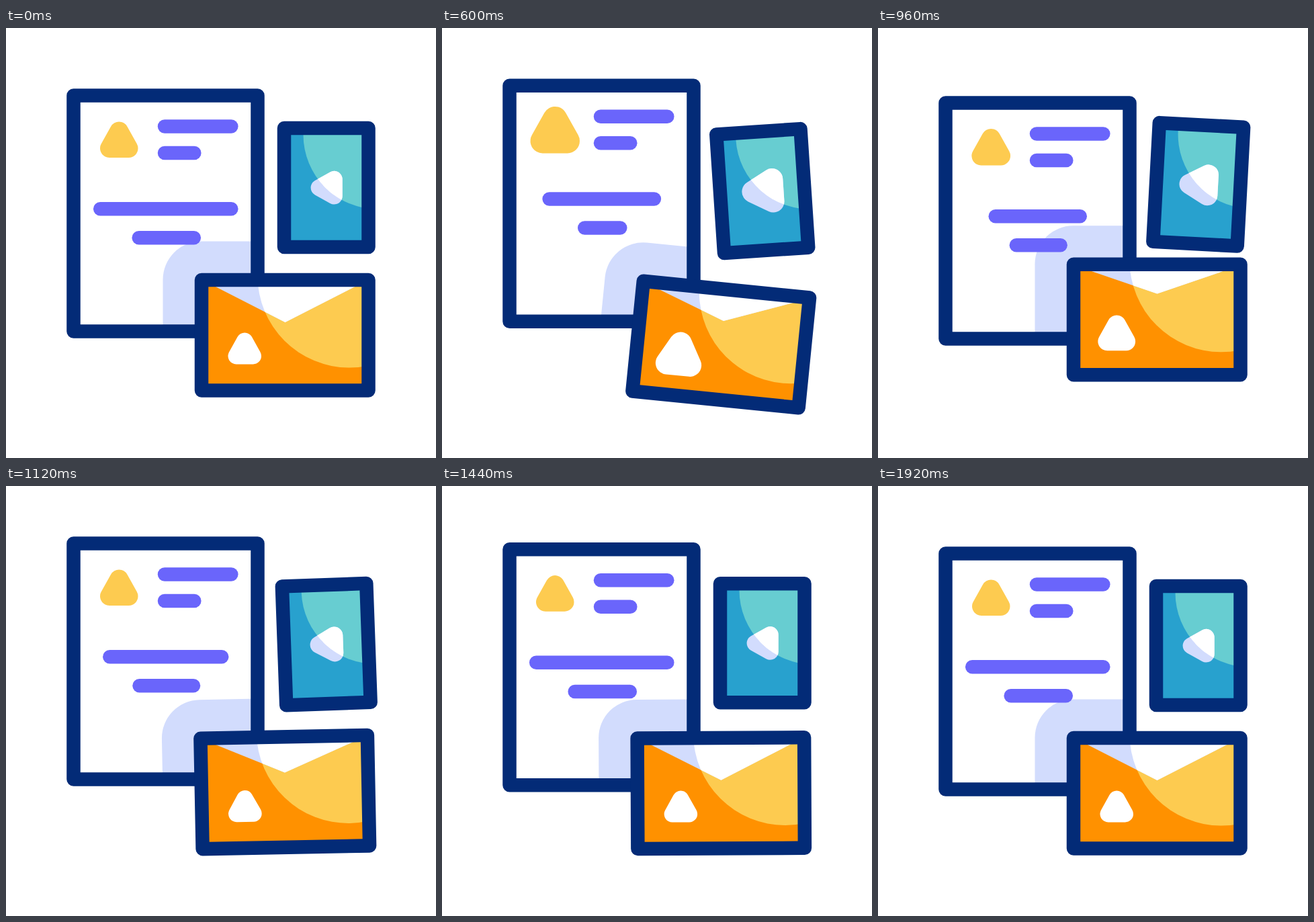
Write an HTML page that moves like this. It is 640 px wide and 640 px high and loops after 2.12 s.

```html
<!DOCTYPE html>
<html lang="en">
<head>
<meta charset="utf-8">
<title>Stationery set</title>
<style>
html, body { margin: 0; width: 100%; height: 100%; overflow: hidden; background: #fff; }
svg { display: block; width: 100%; height: 100%; }

.frame { fill: none; stroke: #032b77; stroke-width: 20.5; stroke-linejoin: round; }
.bar { stroke: #6a65fb; stroke-width: 20.5; stroke-linecap: round; }
.tri { fill: currentColor; stroke: currentColor; stroke-width: 28; stroke-linejoin: round; }
.lilac { color: #d2dcfd; fill: #d2dcfd; }
.white { color: #fff; fill: #fff; }
.yellow { color: #fdcb50; fill: #fdcb50; }

/* Every animation is paused; the script sets its time. */
.paper, .envelope, .card, .pulse, .trim, .flap {
  animation: 2120ms cubic-bezier(.3333, 0, .6667, 1) infinite paused;
}
.paper { --k: 1; animation-name: bob; }
.counter { --k: -1; }
.envelope { transform-origin: 415.5px 457px; animation-name: env-move, env-tilt; }
.card { transform-origin: 477px 237.5px; animation-name: card-move, card-tilt; }
.pulse { --peak: 1.4; animation-name: pulse; }
.trim { stroke-dasharray: 1000 2000; animation-name: trim; }
.flap { transform-origin: 415.5px 379.5px; animation-name: flap; }

.sheet-mark { --peak: 1.32; animation-duration: 2296ms; }
.env-mark { animation-delay: 180ms; }
.card-mark { animation-delay: 260ms; }
.long { animation-delay: 380ms; }
.short { animation-delay: 260ms; }

@keyframes bob {
  0%, 5.66%, 80.19%, 100% { translate: 0 0; }
  19.81% { translate: 0 calc(var(--k) * 17px); }
  32.31% { translate: 0 calc(var(--k) * -25px); }
  43.4% { translate: 0 calc(var(--k) * 14px); }
  52.83% { translate: 0 calc(var(--k) * -15px); }
}
@keyframes env-move {
  0%, 14.15%, 89.62%, 100% { translate: 0 0; }
  26.89% { translate: 0 14.5px; }
  44.34% { translate: 0 -23.6px; }
  59.91% { translate: 0 15px; }
  75.47% { translate: 0 -14px; }
}
@keyframes env-tilt {
  0%, 14.15%, 40.57%, 46.23%, 70.75%, 100% { rotate: 0deg; }
  25.47% { rotate: 6.3deg; }
  58.49% { rotate: -2deg; }
}
@keyframes card-move {
  0%, 83.02%, 100% { translate: 0 0; }
  19.81% { translate: 0 8.2px; }
  46.23% { translate: 0 -4.7px; }
  59.43% { translate: 0 1px; }
  74.53% { translate: 0 -7px; }
}
@keyframes card-tilt {
  0%, 64.15%, 100% { rotate: 0deg; }
  14.15% { rotate: 3.9deg; }
  28.3% { rotate: -3.8deg; }
  42.45% { rotate: 3.8deg; }
  56.6% { rotate: -3.3deg; }
}
@keyframes pulse {
  0%, 45.28%, 100% { scale: 1; }
  22.64% { scale: var(--peak); }
}
@keyframes trim {
  0%, 43.4%, 100% { stroke-dasharray: 1000 2000; stroke-dashoffset: 0; }
  21.7% { stroke-dasharray: 574 2000; stroke-dashoffset: -213; }
}
@keyframes flap {
  0%, 11.79%, 64.62%, 100% { scale: 1 1; }
  38.21% { scale: 1 .598; }
}
</style>
</head>
<body>
<svg viewBox="0 0 640 640">
  <defs>
    <polygon id="tri" class="tri" points="-14.25,13.5 14.25,13.5 0,-12"/>
    <polygon id="fold" points="301,379.5 415.5,438 530,379.5"/>
    <circle id="env-disc" cx="511" cy="369" r="136.5"/>
    <circle id="card-disc" cx="553" cy="159" r="110.5"/>
    <clipPath id="in-sheet"><rect x="100.5" y="100.5" width="274" height="351"/></clipPath>
    <clipPath id="in-env"><rect x="291" y="375" width="248.5" height="164.5"/></clipPath>
    <clipPath id="in-card"><rect x="414" y="149" width="125.5" height="177"/></clipPath>
    <clipPath id="in-env-disc"><use href="#env-disc"/></clipPath>
    <clipPath id="in-card-disc"><use href="#card-disc"/></clipPath>
  </defs>

  <g class="paper">
    <g clip-path="url(#in-sheet)">
      <g class="paper counter">
        <path class="envelope lilac" d="M233.5 580V374.5A57 57 0 0 1 290.5 317.5H500V580Z"/>
      </g>
    </g>
    <g transform="translate(168.25 165.5)"><use href="#tri" class="pulse sheet-mark yellow"/></g>
    <line class="bar" x1="236" y1="146.5" x2="335.3" y2="146.5"/>
    <line class="bar" x1="236" y1="186" x2="280.3" y2="186"/>
    <line class="bar trim long" pathLength="1000" x1="140.2" y1="269.2" x2="335.3" y2="269.2"/>
    <line class="bar trim short" pathLength="1000" x1="197.7" y1="312.3" x2="279.8" y2="312.3"/>
    <rect class="frame" x="100.5" y="100.5" width="274" height="351"/>
  </g>

  <g class="card">
    <g clip-path="url(#in-card)">
      <rect x="414" y="149" width="126" height="177" fill="#28a1ce"/>
      <use href="#card-disc" fill="#67cdd1"/>
      <g transform="translate(476.5 237.7) rotate(-90) scale(.88)"><use href="#tri" class="pulse card-mark lilac"/></g>
      <g clip-path="url(#in-card-disc)">
        <g transform="translate(476.5 237.7) rotate(-90) scale(.88)"><use href="#tri" class="pulse card-mark white"/></g>
      </g>
    </g>
    <rect class="frame" x="414" y="149" width="125.5" height="177"/>
  </g>

  <g class="envelope">
    <g clip-path="url(#in-env)">
      <rect x="291" y="375" width="249" height="165" fill="#ff9100"/>
      <use href="#env-disc" class="yellow"/>
      <use href="#fold" class="flap lilac"/>
      <g clip-path="url(#in-env-disc)"><use href="#fold" class="flap white"/></g>
      <g transform="translate(355.25 476.3) scale(.876)"><use href="#tri" class="pulse env-mark white"/></g>
    </g>
    <rect class="frame" x="291" y="375" width="248.5" height="164.5"/>
  </g>
</svg>
<script>
const LOOP = 2120, STEP = 40, LAST = 1920;
const anims = document.getAnimations();

// The motion advances in 40 ms steps and rests at the end of the loop.
function draw() {
  const t = performance.now() % LOOP;
  const time = Math.min(Math.floor(t / STEP) * STEP, LAST);
  for (const a of anims) a.currentTime = time;
  requestAnimationFrame(draw);
}
draw();
</script>
</body>
</html>
```
